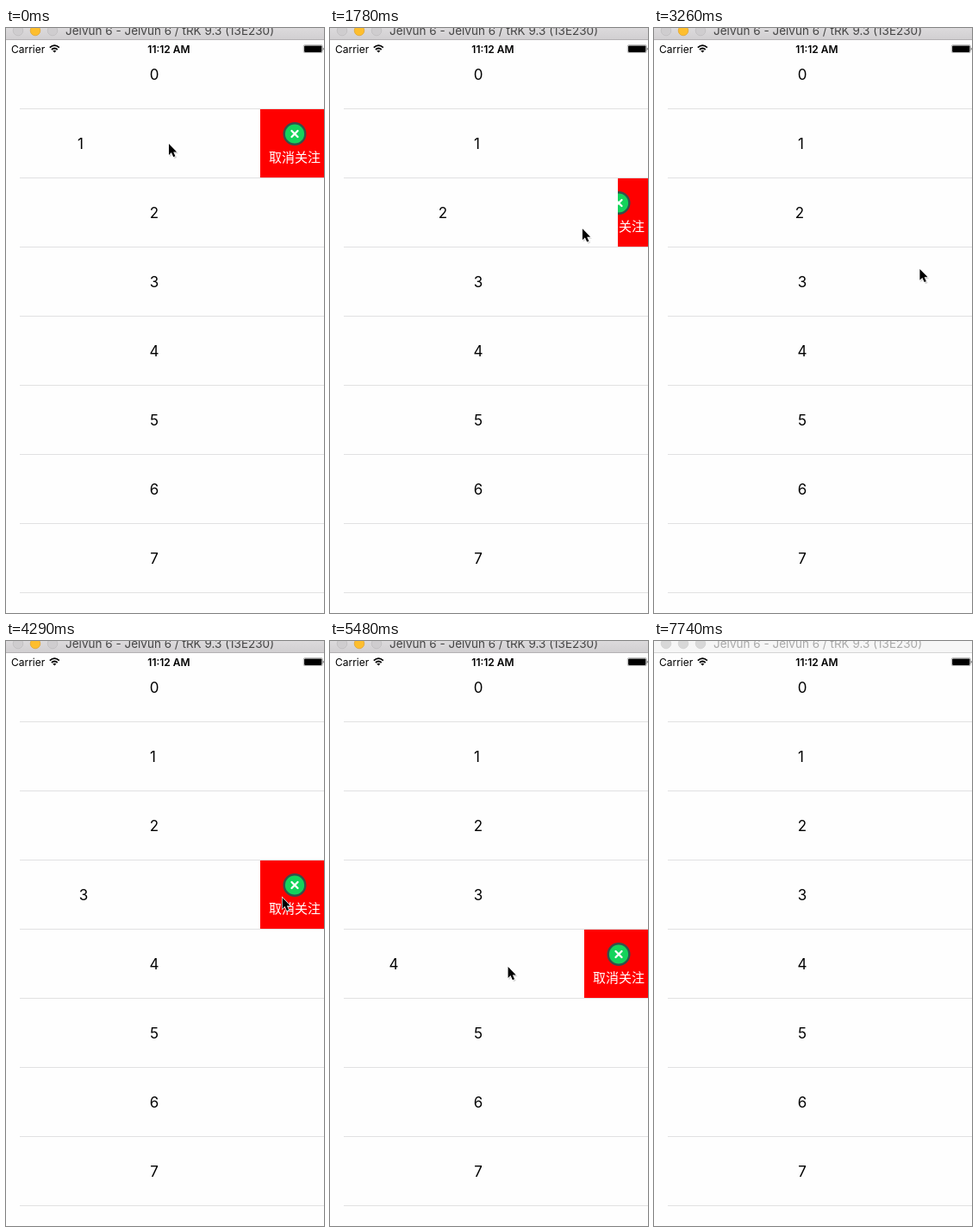
Write an HTML page that moves like this. It is 369x677 px and loops after 7840 ms.

```html
<!DOCTYPE html>
<html lang="zh">
<head>
<meta charset="utf-8">
<title>Swipe list</title>
<style>
  html, body { margin: 0; width: 100%; height: 100%; overflow: hidden; background: #fefefe; }
  svg { display: block; width: 369px; height: 677px; font-family: Inter, Roboto, sans-serif; }
  .label { font-size: 17px; text-anchor: middle; }
  .action { font: 15px "Noto Sans CJK SC", "Noto Sans CJK", sans-serif; fill: #fff; }
  .light { fill: #cfcdcf; stroke: #bcbabc; stroke-width: .7; }
  .amber { fill: #fdbe2e; stroke: #e0a12c; }
  .inactive .light { fill: #d8d8d8; stroke: #cecece; }
  .inactive .bar { fill: #f6f6f6; }
  .inactive .edge { fill: #d4d4d4; }
  .inactive .title { fill: #a9a9a9; }
</style>
</head>
<body>
<svg viewBox="0 0 369 677">
  <defs>
    <linearGradient id="chrome" x2="0" y2="1">
      <stop stop-color="#dcdadc"/><stop offset="1" stop-color="#d1cfd1"/>
    </linearGradient>
    <g id="button">
      <rect x="295" width="80" height="79" fill="#f00"/>
      <circle cx="335" cy="28.5" r="12.3" fill="#14d35c" stroke="#35504a" stroke-width="2.4"/>
      <path d="M331.5 25l7 7m0-7l-7 7" stroke="#fff" stroke-width="2.3" stroke-linecap="round"/>
      <text class="action" x="305" y="61">取消关注</text>
    </g>
  </defs>
  <rect width="369" height="677" fill="#fefefe"/>
  <g id="rows"></g>

  <g id="window">
    <rect class="bar" width="369" height="13" fill="url(#chrome)"/>
    <rect class="edge" y="13" width="369" height="1" fill="#b3b1b3"/>
    <circle class="light" cx="14" cy="3" r="5.8"/>
    <circle class="light amber" cx="34" cy="3" r="5.8"/>
    <circle class="light" cx="54" cy="3" r="5.8"/>
    <text class="title" x="69" y="8" font-size="13.5" fill="#454545">Jelvun 6 - Jelvun 6 / tRK 9.3 (13E230)</text>
  </g>

  <text x="6" y="28.5" font-size="12">Carrier</text>
  <g fill="none" stroke="#000" stroke-width="1.7">
    <path d="M50.8 22.7q5.5-5 11 0M52.9 25q3.4-3 6.8 0"/>
    <path d="M54.3 26.5q2-1.6 4 0l-2 2.1z" fill="#000" stroke="none"/>
  </g>
  <text x="189" y="28.5" font-size="12" font-weight="600" text-anchor="middle">11:12 AM</text>
  <rect x="345.3" y="19.6" width="22" height="9" rx="1.4" fill="#fff" stroke="#888" stroke-width=".6"/>
  <rect x="346.1" y="20.4" width="20.3" height="7.5" rx=".8"/>
  <path d="M367.8 22.6q1.4 1.6 0 3.4z"/>

  <g id="cursor">
    <g transform="scale(.92)">
      <path d="M1 2v14.5l3.5-3 2.6 5.3 3-1.3-2.5-5.2H12z" opacity=".16"/>
      <path d="M0 0v14l3.2-3 2.5 5.5 2.4-1-2.4-5.3H10z" stroke="#fff" stroke-width="1.4" paint-order="stroke"/>
    </g>
  </g>
</svg>
<script>
const LOOP = 7840, STEP = 1000 / 6.75, LAST_STEP = 48, BLUR_AT = 7740;
const ROW_HEIGHT = 80, ROW_TOP = 14, ROW_COUNT = 8, BUTTON_WIDTH = 80, REST = 81.5;

// Each swipe: the step of its furthest pull, the overshoot there, the step when it closes.
const swipes = [
  { row: 1, peak: 1, over: 46, close: 9.2 },
  { row: 2, peak: 14, over: 41, close: 20 },
  { row: 3, peak: 27, over: 54, close: 32.2 },
  { row: 4, peak: 37, over: 17, close: 42.2 }
];

// Where the pointer rests between pulls: step, x, y.
const stops = [
  [0, 259, 134], [8, 286, 201], [10, 305, 282], [13, 300, 215], [16, 289, 235], [24, 312, 287],
  [29, 330, 297], [32, 320, 324], [37, 312, 377], [40, 306, 425], [43, 311, 409], [48, 371, 637]
];

const clamp = p => Math.min(1, Math.max(0, p));
const smooth = p => p * p * (3 - 2 * p);
const easeOut = p => 1 - (1 - p) ** 3;
const bump = (distance, width) => Math.exp(-((distance / width) ** 2));
const byId = id => document.getElementById(id);
const move = (node, x, y) => node.setAttribute('transform', `translate(${x} ${y})`);

function slide({ peak, over, close }, step) {
  const opened = smooth(clamp((step - peak + 3) / 2));
  const closed = easeOut(clamp((step - close) / 3));
  return -(REST * opened * (1 - closed) + over * bump(step - peak, .58));
}

function pointerAt(step) {
  const next = Math.max(1, stops.findIndex(stop => stop[0] >= step));
  const [t0, x0, y0] = stops[next - 1], [t1, x1, y1] = stops[next];
  const mix = smooth((step - t0) / (t1 - t0));
  const pull = swipes.reduce((sum, { peak, over }) =>
    sum + (85 + 1.2 * over) * bump(step - peak, 1.2), 0);
  return [x0 + (x1 - x0) * mix - pull, y0 + (y1 - y0) * mix];
}

byId('rows').innerHTML = Array.from({ length: ROW_COUNT }, (_, i) => `
  <g transform="translate(0 ${ROW_TOP + i * ROW_HEIGHT})">
    <rect x="16" y="79" width="353" height="1" fill="#e1e1e2"/>
    <use href="#button"/>
    <rect class="cover" width="375" height="79" fill="#fefefe"/>
    <text class="label" x="${i === 1 ? 170.5 : 172}" y="46">${i}</text>
  </g>`).join('');

const rows = [...byId('rows').children].map(row => ({
  cover: row.querySelector('.cover'),
  label: row.querySelector('.label')
}));

function draw(time) {
  const step = Math.min(LAST_STEP, Math.floor((time + 6) / STEP));
  for (const swipe of swipes) {
    const { cover, label } = rows[swipe.row];
    const offset = Math.round(slide(swipe, step));
    move(cover, Math.max(-BUTTON_WIDTH, offset), 0);
    move(label, offset, 0);
  }
  move(byId('cursor'), ...pointerAt(step));
  byId('window').classList.toggle('inactive', time >= BLUR_AT);
}

const start = performance.now();
function tick() {
  draw((performance.now() - start) % LOOP);
  requestAnimationFrame(tick);
}
tick();
</script>
</body>
</html>
```
